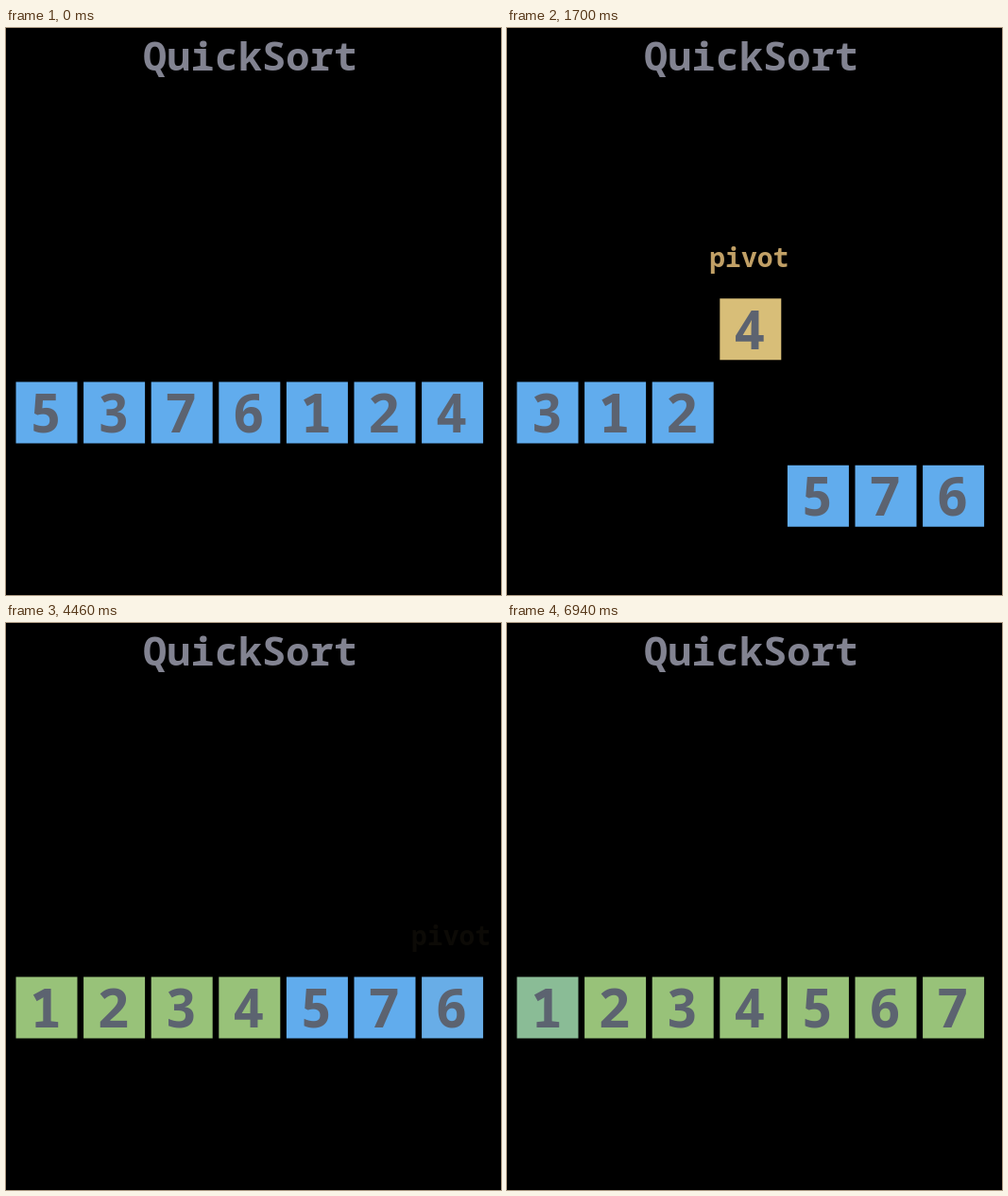
Animation of 524x600 px, one loop 6.97 s. Source, as an HTML page with a canvas:

```html
<!DOCTYPE html>
<html lang="en">
<head>
<meta charset="utf-8">
<title>QuickSort</title>
<style>
  html, body { margin: 0; width: 100%; height: 100%; overflow: hidden; background: #000; }
  canvas { display: block; }
</style>
</head>
<body>
<canvas id="stage" width="524" height="600"></canvas>
<script>
const ctx = document.getElementById('stage').getContext('2d');
const LOOP = 6970, STEP = 400;
const SIZE = 65, PITCH = 71.6, LEFT = 43, MIDDLE = 407, ROW = 89.5;
const BLUE = [97, 172, 237], GOLD = [228, 189, 120], GREEN = [152, 194, 121];

const ramp = (t, start) => Math.min(1, Math.max(0, (t - start) / STEP));
const ease = p => p < 0.5 ? 4 * p ** 3 : 1 - 4 * (1 - p) ** 3;
const tween = (t, start) => ease(ramp(t, start));
const mix = (a, b, p) => a.map((v, i) => v + (b[i] - v) * p);
const css = c => `rgb(${c.map(Math.round)})`;

// Each partition uses the last value of its range as the pivot.
let order = [5, 3, 7, 6, 1, 2, 4];
const first = order;
const rounds = [[40, 0, 6], [2040, 0, 2], [4440, 4, 6]].map(([start, lo, hi]) => {
  const part = order.slice(lo, hi + 1), pivot = order[hi], from = order;
  order = [...order.slice(0, lo),
    ...part.filter(v => v < pivot), pivot, ...part.filter(v => v > pivot),
    ...order.slice(hi + 1)];
  return { start, pivot, part, from, to: order };
});
const leaves = { 1: 4040, 3: 4040, 5: 6440, 7: 6440 };
const RESET = 6840;

function pose(value, t) {
  const b = { value, slot: first.indexOf(value), y: 0, turn: 0, label: 0, color: BLUE };
  for (const { start, pivot, part, from, to } of rounds) {
    if (t < start || !part.includes(value)) continue;
    const at = n => start + n * STEP;
    const a = from.indexOf(value), z = to.indexOf(value);
    if (value === pivot) {
      const move = ramp(t, at(1)), rise = ramp(t, start), fall = ramp(t, at(4));
      b.slot = a + (z - a) * ease(move);
      b.y = -ROW * (ease(rise) - ease(fall));
      b.turn = -12.5 * Math.sin(Math.PI * move);
      b.label = rise - fall;
      b.color = mix(mix(BLUE, GOLD, rise), GREEN, fall);
    } else {
      b.slot = a + (z - a) * tween(t, at(3));
      b.y = value > pivot ? ROW * (tween(t, at(2)) - tween(t, at(4))) : 0;
    }
  }
  if (leaves[value]) b.color = mix(b.color, GREEN, ramp(t, leaves[value]));
  if (value === 1) b.color = mix(b.color, BLUE, ramp(t, RESET));
  return b;
}

function write(text, x, y, size, color) {
  ctx.font = `600 ${size}px "Noto Sans Mono", "DejaVu Sans Mono", monospace`;
  ctx.fillStyle = color;
  ctx.fillText(text, x, y);
}

function drawBlock({ value, slot, y, turn, label, color }) {
  ctx.save();
  ctx.translate(LEFT + slot * PITCH, MIDDLE + y);
  ctx.rotate(turn * Math.PI / 180);
  ctx.fillStyle = css(color);
  ctx.fillRect(-SIZE / 2, -SIZE / 2, SIZE, SIZE);
  write(value, -1, 21, 57, '#5c6370');
  ctx.globalAlpha = label;
  write('pivot', -1.5, -66, 28, css(GOLD));
  ctx.restore();
}

function draw() {
  const t = performance.now() % LOOP;
  ctx.fillStyle = '#000';
  ctx.fillRect(0, 0, 524, 600);
  ctx.textAlign = 'center';
  write('QuickSort', 258.5, 45, 42, '#828391');
  first.map(v => pose(v, t)).sort((a, b) => a.label - b.label).forEach(drawBlock);
  requestAnimationFrame(draw);
}
draw();
</script>
</body>
</html>
```
